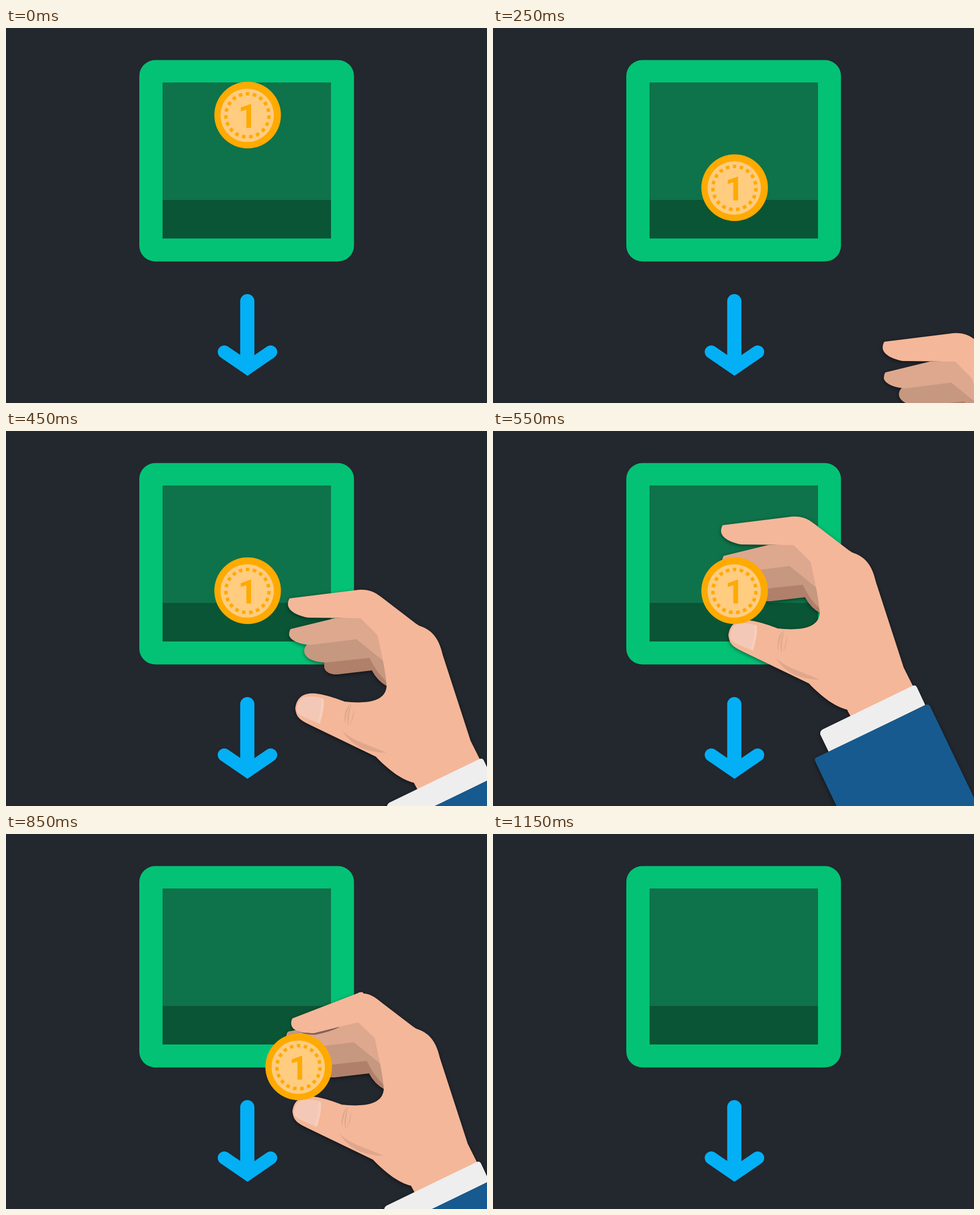
An HTML page with a canvas that plays this animation: 848 by 661 pixels, repeating every 1.35 s.

```html
<!DOCTYPE html>
<html lang="en">
<head>
<meta charset="utf-8">
<title>Coin return</title>
<style>
  html, body { margin: 0; width: 100%; height: 100%; overflow: hidden; background: #23272e; }
  canvas { display: block; }
</style>
</head>
<body>
<canvas id="stage" width="848" height="661"></canvas>
<script>
const WIDTH = 848, HEIGHT = 661, LOOP = 1350, STEP = 100;
const ctx = document.getElementById('stage').getContext('2d');

const SKIN = '#f4b799', MIDDLE = '#dda88e', RING = '#c6987f', PINKY = '#b0806b';

// Hand outlines in stage coordinates, posed where the hand meets the coin.
const INDEX_OPEN = 'M627 210 L567 164 C550 151 539 149 518 152 L405 166 '
  + 'Q402 170 402 177 C403 189 420 197 438 200 L530 201';
const INDEX_CLOSED = 'M627 210 L572 168 C560 158 552 153 540 152 L539 150 Q534 149 529 152 '
  + 'L415 196 Q412 201 413 207 C415 219 432 222 453 222 L497 211 L531 203';
const PALM = ' L560 231 L570 278 Q575 305 576 320 C575 352 530 351 502 348 '
  + 'C490 344 475 337 453 334 C435 332 418 336 415 360 C417 378 425 381 445 391 '
  + 'L557 445 C580 469 603 486 624 491 L631 504 L680 500 L741 451 L724 417 '
  + 'L675 266 C668 235 655 221 633 214 Z';

function fill(g, color, path) {
  g.fillStyle = color;
  g.fill(new Path2D(path));
}

function makeHand(closed) {
  const sprite = document.createElement('canvas');
  sprite.width = WIDTH;
  sprite.height = HEIGHT;
  const g = sprite.getContext('2d');

  fill(g, PINKY, 'M466 276 L466 288 Q470 301 490 300 L550 293 Q560 312 577 321 L577 300 L546 268 Z');
  fill(g, RING, 'M436 247 Q429 254 431 262 C435 274 452 279 470 279 L546 271 Q558 297 577 314 L572 272 L523 236 Z');
  fill(g, MIDDLE, 'M485 201 L407 220 Q404 223 404 231 C407 241 425 248 443 248 L523 238 L571 277 L562 228 L530 199 Z');
  if (closed) {
    fill(g, RING, 'M404 231 L408 219 L428 216 L428 232 Z');
    fill(g, '#806357', 'M420 216 L497 209 L497 212 Q480 220 455 225 Q432 225 420 216 Z');
  }
  fill(g, SKIN, (closed ? INDEX_CLOSED : INDEX_OPEN) + PALM);

  // Thumbnail and skin folds
  fill(g, '#f4c8b6', 'M418 360 C419 350 424 342 431 340 Q450 337 465 343 Q467 361 458 387 Q437 379 424 372 Q416 367 418 360 Z');
  fill(g, '#f6cfbb', 'M461 342 L465 343 Q467 361 458 387 L454 385 Q462 361 461 342 Z');
  fill(g, '#dfa78d', 'M498 399 C515 417 540 422 575 438 C545 438 515 428 498 399 Z');
  fill(g, '#dfa78d', 'M513 351 Q498 365 503 388 Q503 367 513 351 Z '
    + 'M514 352 Q503 372 509 392 Q508 372 514 352 Z M518 359 Q520 376 510 391 Q517 376 518 359 Z');

  fill(g, '#eeeeee', 'M581 526 L738 450 Q745 446 748 453 L762 483 L592 566 L577 535 Q576 529 581 526 Z');
  fill(g, '#175a8f', 'M571 575 L763 483 Q768 480 771 486 L912 780 L662 780 L568 582 Q566 577 571 575 Z');
  return sprite;
}

const openHand = makeHand(false);
const closedHand = makeHand(true);

function drawHand(sprite, x, y) {
  ctx.save();
  ctx.shadowColor = 'rgba(0, 0, 0, 0.5)';
  ctx.shadowBlur = 6;
  ctx.shadowOffsetY = 2;
  ctx.drawImage(sprite, x, y);
  ctx.restore();
}

function disc(x, y, radius, color) {
  ctx.fillStyle = color;
  ctx.beginPath();
  ctx.arc(x, y, radius, 0, Math.PI * 2);
  ctx.fill();
}

function drawCoin(x, y) {
  const gold = '#ffaa00', ringRadius = 38, dashCount = 19;
  disc(x, y, 58.7, gold);
  disc(x - 0.8, y + 0.5, 47, '#ffcc80');

  ctx.save();
  ctx.translate(x - 0.4, y + 0.5);
  ctx.rotate(-Math.PI / 2);
  const dash = Math.PI * ringRadius / dashCount;
  ctx.setLineDash([dash, dash]);
  ctx.lineDashOffset = dash / 2;
  ctx.lineWidth = 6;
  ctx.strokeStyle = gold;
  ctx.beginPath();
  ctx.arc(0, 0, ringRadius, 0, Math.PI * 2);
  ctx.stroke();
  ctx.restore();

  ctx.font = '700 59px Roboto, sans-serif';
  ctx.fillStyle = gold;
  ctx.fillText('1', x + 7 - ctx.measureText('1').actualBoundingBoxRight, y + 22);
}

function drawScene() {
  ctx.fillStyle = '#23272e';
  ctx.fillRect(0, 0, WIDTH, HEIGHT);

  ctx.fillStyle = '#03c275';
  ctx.beginPath();
  ctx.roundRect(235, 56.5, 378.5, 355, 28);
  ctx.fill();
  ctx.fillStyle = '#0e724a';
  ctx.fillRect(276, 96, 297, 207);
  ctx.fillStyle = '#0a5536';
  ctx.fillRect(276, 303, 297, 68);

  ctx.strokeStyle = '#03b0f5';
  ctx.lineCap = 'round';
  ctx.lineJoin = 'miter';
  ctx.lineWidth = 25;
  ctx.stroke(new Path2D('M425.4 481.5 V585'));
  ctx.lineWidth = 23;
  ctx.stroke(new Path2D('M384.8 571 L425.7 599 L466.6 571'));
  ctx.lineCap = 'butt';
}

function render(time) {
  const coinX = 426, coinY = time < 100 ? 153.5 : 281.5;
  drawScene();
  if (time < 750) {
    if (time >= 250) {
      const left = Math.max(0, 3 - Math.floor((time - 250) / STEP));
      drawHand(openHand, left * 95, left * 129);
    }
    drawCoin(coinX, coinY);
  } else if (time < 1150) {
    const step = Math.floor((time - 750) / STEP);
    const dx = step * 90, dy = step * 129;
    drawHand(closedHand, dx, dy);
    drawCoin(coinX + dx, coinY + dy);
  }
}

function tick() {
  render(performance.now() % LOOP);
  requestAnimationFrame(tick);
}
tick();
</script>
</body>
</html>
```
